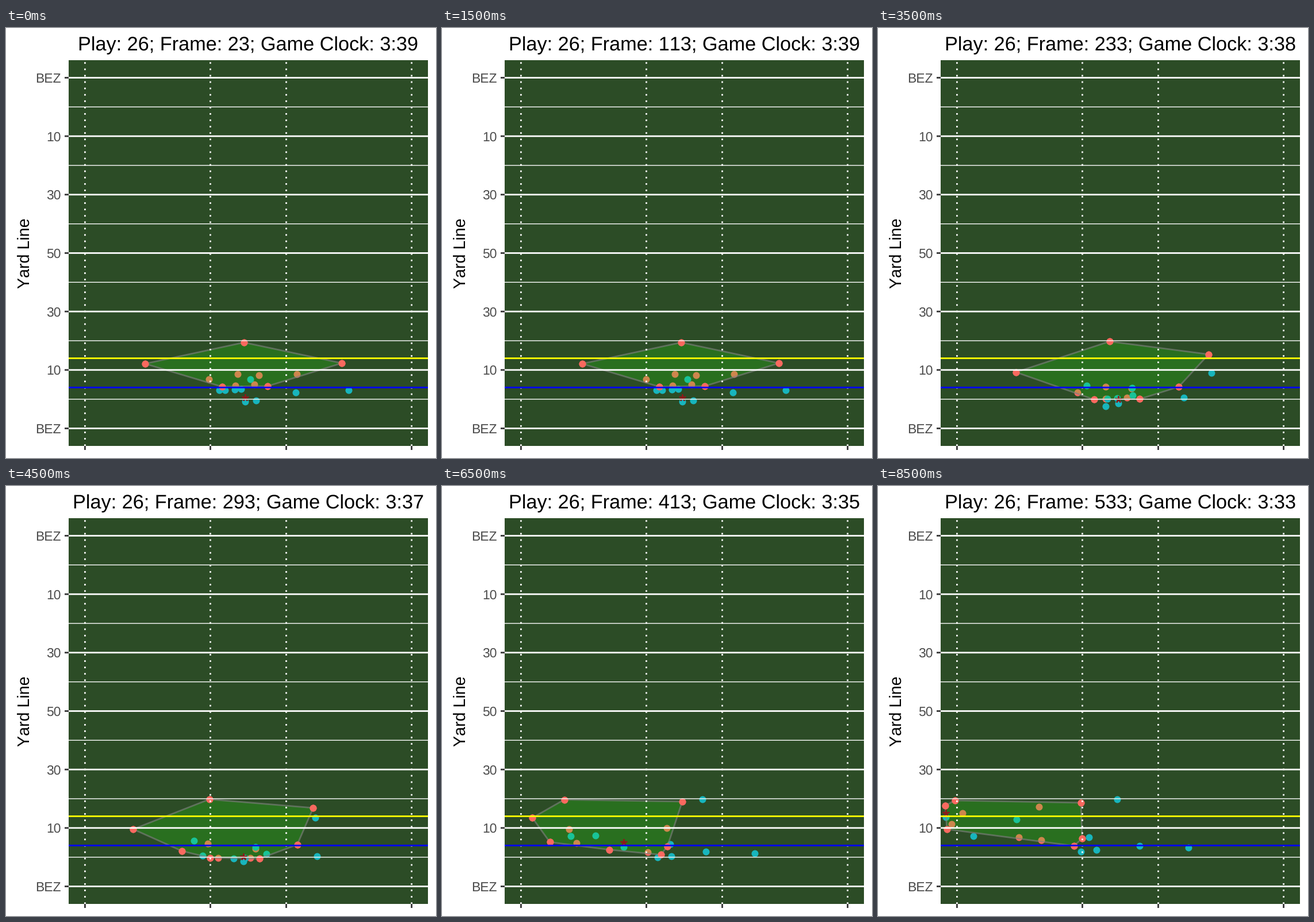
These frames come from a looping animation (748 by 748 pixels, 9 s). A matplotlib script:

```python
import numpy as np
import matplotlib.pyplot as plt
from matplotlib.animation import FuncAnimation
from matplotlib.patches import Polygon, Rectangle

SIZE, DPI = 748, 100
PT = 72 / DPI  # points per pixel
FRAMES, STEP = 18, 500
LEFT, RIGHT, TOP, BOTTOM = 109, 734, 56, 727
THICK, THIN = 2.77, 1.39

FIELD, DEFENCE, OFFENCE = "#2c4c26", "#f9695f", "#18b5bd"
SET, SNAP, SWEEP, END = 3, 4, 5.5, 17  # phases of the play, in steps


class Unit:
    """Players sharing a pace and a sideways bend on the way to their end spots."""

    def __init__(self, pace, bend, *routes):
        routes = np.array(routes, float)
        self.start, self.end = routes[:, :2], routes[:, 2:]
        self.pace, self.bend = pace, np.array(bend)

    def at(self, t):
        u = np.clip((t - SWEEP) / (END - SWEEP), 0, 1) ** self.pace
        moved = u * u * (3 - 2 * u)
        swing = np.sin(np.pi * np.clip((t - SNAP) / (END - SNAP), 0, 1) ** 0.75)
        shuffle = np.array([-2, 0]) * max(0, 1 - t / SET)
        return (self.start + (self.end - self.start) * moved
                + self.bend * swing + shuffle)


# Routes run from (x, y) at the snap to (x, y) at the end.
carrier = Unit(2.2, (0, 4), (418, 650, 118, 576))
offence = [
    carrier,
    Unit(1, (0, -8), (373, 630, 166, 609)),
    Unit(1, (20, 17), (383, 630, 353, 636), (400, 629, 380, 633), (427, 611, 367, 611)),
    Unit(0.3, (8, 14), (411, 628, 455, 626), (506, 634, 540, 629)),
    Unit(0.6, (0, 28), (437, 648, 241, 580)),
    Unit(0.8, (0, -25), (598, 630, 416, 545)),
]
defence = [
    Unit(1.1, (0, 18), (244, 584, 117, 556)),
    Unit(1, (0, -2), (416, 547, 134, 547)),
    Unit(1, (0, -16), (586, 583, 353, 551)),
    Unit(1, (3, 27), (355, 611, 120, 597), (405, 602, 147, 569), (401, 622, 245, 611)),
    Unit(1.4, (0, 26), (378, 624, 128, 588), (434, 620, 341, 626),
         (442, 604, 355, 613), (457, 623, 284, 616)),
    Unit(1.4, (20, 26), (508, 602, 280, 558)),
]


def positions(team, t):
    return np.vstack([unit.at(t) for unit in team])


def hull(points):
    """Convex hull by monotone chain."""
    pts = sorted(map(tuple, points))

    def chain(seq):
        out = []
        for x, y in seq:
            while len(out) > 1:
                (ax, ay), (bx, by) = out[-2:]
                if (bx - ax) * (y - ay) - (by - ay) * (x - ax) > 0:
                    break
                out.pop()
            out.append((x, y))
        return out[:-1]

    return np.array(chain(pts) + chain(pts[::-1]))


plt.rcParams.update({"font.family": "Liberation Sans",
                     "text.kerning_factor": 6, "text.hinting": "none"})
fig = plt.figure(figsize=(SIZE / DPI, SIZE / DPI), dpi=DPI, facecolor="white")
ax = fig.add_axes([0, 0, 1, 1])
ax.set_xlim(0, SIZE)
ax.set_ylim(SIZE, 0)
ax.axis("off")


def line(xs, ys, color="white", width=THICK, z=6, **kw):
    ax.plot(xs, ys, color=color, lw=width * PT, zorder=z, snap=False,
            solid_capstyle="butt", dash_capstyle="butt", **kw)


def label(x, y, text, px, color="black", **kw):
    return ax.text(x, y, text, fontsize=px * PT, color=color,
                   va="baseline", **kw)


def dots(color, z):
    return ax.scatter([], [], s=(12 * PT) ** 2, c=color, linewidths=0, zorder=z)


ax.add_patch(Rectangle((LEFT, TOP), RIGHT - LEFT, BOTTOM - TOP,
                       fc=FIELD, ec="none", zorder=0))

# The field fills the panel with a 5% margin on every side.
YARD_Y = (BOTTOM - TOP) / 1.1 / 120
YARD_X = (RIGHT - LEFT) / 1.1 / 53.33
GOAL_Y = TOP + (BOTTOM - TOP) / 22
SIDE_X = LEFT + (RIGHT - LEFT) / 22

for n, name in enumerate(["BEZ", "10", "30", "50", "30", "10", "BEZ"]):
    y = GOAL_Y + 20 * n * YARD_Y
    line([LEFT, RIGHT], [y, y])
    line([LEFT - 7, LEFT], [y, y], "#333333")
    label(96, y + 8.2, name, 22.9, "#4d4d4d", ha="right")
    if n < 6:
        line([LEFT, RIGHT], [y + 10 * YARD_Y] * 2, width=THIN)
for yards in (0, 20.47, 32.86, 53.33):
    x = SIDE_X + yards * YARD_X
    line([x, x], [BOTTOM, TOP], ls=(0, (1, 3)))
    line([x, x], [BOTTOM, BOTTOM + 7], "#333333")
for yards, color in ((106, "#0000ff"), (96, "#ffff00")):
    line([LEFT, RIGHT], [GOAL_Y + yards * YARD_Y] * 2, color, z=7)

label(41, (TOP + BOTTOM) / 2, "Yard Line", 28.6, rotation=90,
      rotation_mode="anchor", ha="center")
title = label((LEFT + RIGHT) / 2, 39, "", 34.3, ha="center")

defence_dots = dots(DEFENCE, 1)
offence_dots = dots(OFFENCE, 2)
zone = ax.add_patch(Polygon([(0, 0), (1, 0), (0, 1)], fc=(0.12, 1, 0.02, 0.2),
                            ec=(0.5, 0.5, 0.5, 0.62), lw=THICK * PT,
                            joinstyle="round", zorder=3))
edge_dots = dots(DEFENCE, 4)
ball, = ax.plot([], [], ls="none", marker=(5, 2, 0), ms=12 * PT,
                mew=2.4 * PT, color="#8b1a1a", zorder=5)


def draw(i):
    reds = positions(defence, i)
    edge = hull(reds)
    defence_dots.set_offsets(reds)
    offence_dots.set_offsets(positions(offence, i))
    edge_dots.set_offsets(edge)
    zone.set_xy(edge)
    ball.set_data(*(carrier.at(i) - [0, 7.5]).T)
    clock = 39 - max(0, (i - 5) // 2)
    title.set_text(f"Play: 26; Frame: {23 + 30 * i}; Game Clock: 3:{clock}")
    return title, defence_dots, offence_dots, zone, edge_dots, ball


anim = FuncAnimation(fig, draw, frames=FRAMES, interval=STEP,
                     repeat=True, repeat_delay=0, blit=False)
plt.show()
```
